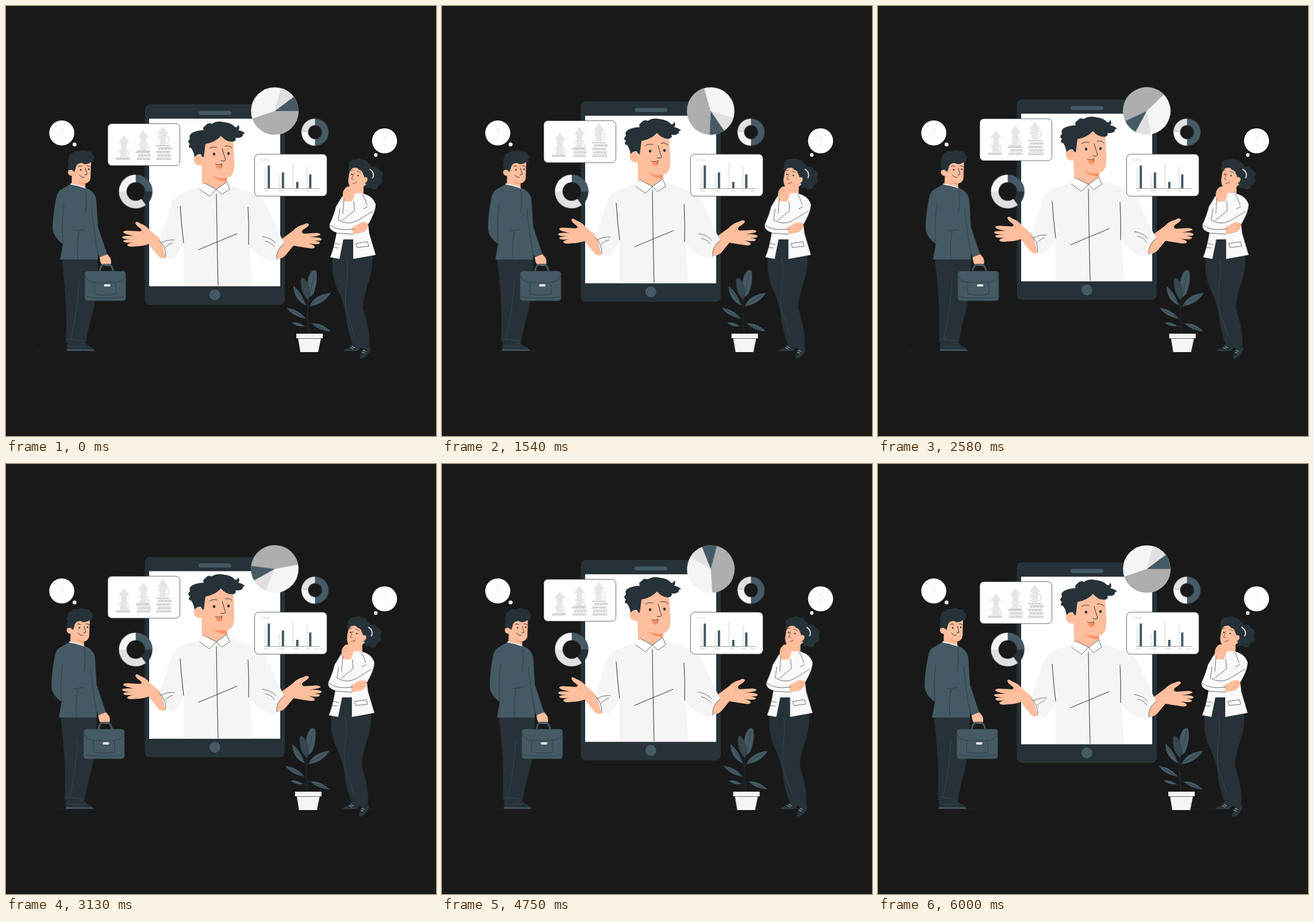
These frames come from a looping animation (748 px wide and 748 px high, 6.04 s). An HTML page:

```html
<!DOCTYPE html>
<html lang="en">
<head>
<meta charset="utf-8">
<title>Online presentation</title>
<style>
  html, body { margin: 0; width: 100%; height: 100%; overflow: hidden; background: #191919; }
  svg { display: block; width: 100vw; height: 100vh; }
  .float, .shake, .spin { animation: 6.04s linear infinite; }
  .float { animation-name: float; }
  .shake { animation-name: shake; }
  .spin { animation-name: spin; transform-origin: 467.5px 182.7px; }

  /* Six seconds of motion, then a 40 ms hold */
  @keyframes float {
    0%, 99.34%, 100% { transform: translateY(0); }
    49.67% { transform: translateY(-10px); }
  }
  @keyframes shake {
    0%, 99.34%, 100% { transform: translateX(0); }
    9.93%, 89.4% { transform: translateX(-1px); }
    19.87%, 79.47% { transform: translateX(2px); }
    29.8%, 49.67%, 69.54% { transform: translateX(-4px); }
    39.74%, 59.6% { transform: translateX(4px); }
  }
  @keyframes spin {
    from { transform: rotate(0); }
    99.34%, to { transform: rotate(360deg); }
  }

  .ink { fill: #263238; }
  .slate { fill: #455a64; }
  .skin { fill: #ffbe9d; }
  .warm { fill: #ff8f66; }
  .pale { fill: #f5f5f5; }
  .white { fill: #fff; }
  .soft { fill: #e6e6e6; }
  .line { fill: none; stroke: #263238; stroke-width: 1; stroke-linecap: round; stroke-linejoin: round; }
  .thin { stroke-width: .7; }
  .seam { fill: none; stroke: #455a64; stroke-width: .6; }
  .fold { fill: none; stroke: #eb996e; stroke-width: .8; stroke-linecap: round; }
  .ring circle { fill: none; }
  .coins { fill: none; stroke: #777; stroke-width: 2.4; stroke-dasharray: .8 1.6; }
  .rims { fill: none; stroke: #999; stroke-width: .6; }
  text { font-family: "Open Sans", "Noto Sans", sans-serif; text-anchor: middle; }
  .sum { font-size: 19px; font-weight: 700; fill: #e9e9e9; }
  .ask { font-size: 22px; fill: #efefef; }
</style>
</head>
<body>
<svg viewBox="0 0 748 748">
  <path d="M50 600H697" stroke="#242a2d" stroke-width=".8"/>

  <!-- Thought bubbles -->
  <g class="white">
    <circle cx="97" cy="220.8" r="21.8"/><circle cx="119.3" cy="240.8" r="3.4"/>
    <circle cx="658.5" cy="234.5" r="21.8"/><circle cx="643.2" cy="259.2" r="3.1"/>
  </g>
  <text class="ask" x="97" y="228.5">?</text>
  <text class="ask" x="658.5" y="242.5">?</text>

  <g class="float">
    <!-- Tablet -->
    <rect class="ink" x="241.5" y="171" width="243.5" height="349" rx="9"/>
    <rect class="white" x="249" y="196" width="228" height="291.5"/>
    <rect class="slate" x="335" y="182.5" width="57" height="7" rx="3.5"/>
    <circle class="slate" cx="363.3" cy="502.4" r="9.5"/>

    <!-- Presenter: hands -->
    <path class="skin" d="M278 438Q271 441 265 435L248 414Q238 418 226 418Q213 420 211 416Q211 413 222 411Q206 413 204 409Q204 406 221 406Q202 406 202 402Q203 399 222 400Q203 396 204 393Q206 390 215 391L233 392Q238 391 234 387Q226 382 225 377Q227 373 233 378Q243 381 250 390L269 406Z"/>
    <path class="fold" d="M236 388Q241 393 239 397"/>
    <path class="skin" d="M471 440Q480 440 486 434L500 417Q512 419 525 421Q537 423 537 419Q537 416 526 413Q545 416 546 412Q546 409 528 407Q549 410 549 406Q549 402 528 402Q548 400 547 397Q544 394 536 395L518 396Q512 394 517 389Q526 384 527 380Q524 376 518 380Q506 383 499 391L472 411Z"/>
    <path class="fold" d="M515 390Q509 394 511 399"/>

    <!-- Presenter: shirt -->
    <path class="pale" d="M341 314Q316 321 302 328Q291 334 286 350L267 408Q278 419 278 438Q291 444 298 431L309 414V487H428L424 418Q438 436 454 441Q464 446 471 442Q469 425 484 413Q470 385 454 349Q445 330 425 325L388 311Z"/>
    <path class="line" d="M366 327Q367 410 369 486M335 424L402 396M303 348Q305 380 309 412M421 350Q423 382 422 415"/>
    <path class="line thin" d="M267 408Q279 420 278 436M270 412Q281 406 293 407M277 420Q284 413 290 412M484 413Q469 424 471 441M446 401Q463 404 469 413M451 409Q463 412 467 419"/>

    <!-- Presenter: head -->
    <path class="skin" d="M340 262L341 310Q354 318 366 319Q378 315 385 305L384 280Z"/>
    <path class="warm" d="M357 294Q368 300 384 299V305Q368 305 357 294Z"/>
    <path class="skin" d="M341 239L341 260Q337 257 331 259Q325 263 327 270Q330 279 341 277Q344 291 366 298Q390 303 395 290Q398 283 397 267L395 229Q370 213 341 239Z"/>
    <path class="fold" d="M331 265Q336 264 338 271"/>
    <path class="ink" d="M328 263Q327 254 322 247Q315 246 320 240Q314 236 320 231Q317 224 325 220Q334 216 344 216Q341 211 347 208Q351 202 358 205Q367 199 379 202Q392 203 399 211Q404 211 403 206Q408 211 404 216Q411 217 416 222Q411 222 412 226Q407 231 399 229Q402 234 395 236Q383 237 374 226Q364 237 347 240L344 263Q341 263 339 258Q332 257 328 263Z"/>
    <path class="line" stroke-width="1.4" d="M354 248Q359 244 367 246M381 244Q388 242 393 247"/>
    <ellipse class="ink" cx="362" cy="257.5" rx="2.2" ry="2.6"/>
    <ellipse class="ink" cx="387" cy="256.5" rx="2.2" ry="2.6"/>
    <path class="line" d="M376 248Q380 262 382 268Q379 271 374 269"/>
    <path class="warm" d="M365 275Q371 277 376 274Q377 283 371 284Q366 283 365 275Z"/>
    <path class="line thin" d="M364 275Q371 277 376 274Q376 278 374 280"/>
    <path class="white" d="M345 308L366 319L354 331L337 319ZM366 319L384 306L389 319L375 328Z"/>
    <path class="line thin" d="M345 308L366 319L354 331L337 319M366 319L384 306L389 319L375 328L366 319"/>

    <!-- Savings card -->
    <rect x="177" y="204.7" width="125.5" height="73" rx="7" fill="#fff" stroke="#263238" stroke-width=".7"/>
    <path class="soft" d="M205 225.5L215 238H210V263H200V238H195ZM239 216L249 229H244V252H234V229H229ZM273 209.5L283 223H278V241H268V223H263Z"/>
    <text class="sum" x="204" y="264">10</text>
    <text class="sum" x="239.5" y="253">25</text>
    <text class="sum" x="274.5" y="239">50</text>
    <path class="coins" d="M192 266.5H216M228 266.5H251M230 260.5H252M227 254.5H250M262 266.5H287M264 260.5H288M262 254.5H286M265 248.5H288M262 243H286"/>
    <path class="rims" d="M192 264.5H216M228 264H251M230 258H252M227 252.5H250M262 264H287M264 258H288M262 252.5H286M265 246.5H288"/>
  </g>

  <!-- Bar chart card -->
  <rect x="432.5" y="257.8" width="125.8" height="73" rx="7" fill="#fff" stroke="#263238" stroke-width=".7"/>
  <g fill="#dedede">
    <circle cx="445" cy="267.7" r="1.7"/><circle cx="450.3" cy="267.7" r="1.7"/><circle cx="455.6" cy="267.7" r="1.7"/>
  </g>
  <path d="M451 283V317M475.5 294V317M499.5 273V317M523.5 280V317" stroke="#f0f0f0" stroke-width="4"/>
  <path d="M457.2 277.5V317M481.8 289.5V317M506.7 306V317M529.3 293V317" stroke="#455a64" stroke-width="4"/>
  <path d="M449 317.6H546" stroke="#999" stroke-width="1"/>
  <path d="M449 321.5H458M474 321.5H483M501 321.5H510M521 321.5H529M537 321.5H545" stroke="#ccc"/>

  <!-- Pie and ring charts -->
  <g class="spin">
    <g class="ring" stroke-width="41.3">
      <circle cx="467.5" cy="182.7" r="20.65" stroke="#f5f5f5"/>
      <circle cx="467.5" cy="182.7" r="20.65" stroke="#aeaeae" pathLength="360" stroke-dasharray="161 360"/>
      <circle cx="467.5" cy="182.7" r="20.65" stroke="#e0e0e0" pathLength="360" stroke-dasharray="38 360" stroke-dashoffset="-285"/>
      <circle cx="467.5" cy="182.7" r="20.65" stroke="#455a64" pathLength="360" stroke-dasharray="37 360" stroke-dashoffset="-323"/>
    </g>
  </g>
  <g class="ring" stroke-width="13.2" transform="translate(225.7 322.7) rotate(-90)">
    <circle r="22.7" stroke="#455a64" pathLength="360" stroke-dasharray="90 360"/>
    <circle r="22.7" stroke="#263238" pathLength="360" stroke-dasharray="53 360" stroke-dashoffset="-90"/>
    <circle r="22.7" stroke="#e0e0e0" pathLength="360" stroke-dasharray="127 360" stroke-dashoffset="-143"/>
    <circle r="22.7" stroke="#f5f5f5" pathLength="360" stroke-dasharray="90 360" stroke-dashoffset="-270"/>
  </g>
  <g class="ring" stroke-width="11.5" transform="translate(537.5 219.5) rotate(-90)">
    <circle r="17.8" stroke="#455a64" pathLength="360" stroke-dasharray="180 360"/>
    <circle r="17.8" stroke="#f5f5f5" pathLength="360" stroke-dasharray="95 360" stroke-dashoffset="-180"/>
    <circle r="17.8" stroke="#e0e0e0" pathLength="360" stroke-dasharray="85 360" stroke-dashoffset="-275"/>
  </g>

  <g class="shake">
    <!-- Man with briefcase -->
    <path class="ink" d="M97 438Q101 470 103 500Q106 535 104 584L139 585Q143 560 152 528Q160 486 160 438Z"/>
    <path class="seam" d="M127 480Q124 530 113 580M106 579L137 583"/>
    <path class="ink" d="M107 583H136Q142 591 151 595Q154 597 154 600H106Z"/>
    <path class="slate" d="M106 597L151 597.5Q154 598 154 599.5H106Z"/>
    <path class="seam" d="M106 590Q122 594 140 591M130 588L137 586"/>
    <path class="skin" d="M163 432L174 429L182 439Q185 450 179 452L168 451Q162 446 163 432Z"/>
    <path class="skin" d="M115 285L114 311Q126 318 138 315V298Z"/>
    <path class="slate" d="M112 310Q127 312 140 317Q154 322 157 336L160 384Q168 408 176 432L163 437L160 431V441H94L99 414Q82 402 81 386Q82 360 87 335Q89 322 98 318Z"/>
    <path class="pale" d="M112 308.5Q126 311 138 315.5L139 317.5Q126 312.5 112 310.5Z"/>
    <path class="line thin" d="M101 347Q96 375 99 414M138 320Q142 336 138 360M127 392Q123 415 125 440M120 391L138 389M149 352Q154 400 160 431"/>
    <path class="skin" d="M119 267L118 285Q113 282 109 285Q106 290 110 294Q114 297 119 295Q122 306 134 309Q145 309 147 300L148 269Q132 258 119 267Z"/>
    <path class="ink" d="M110 286Q106 279 109 273Q105 268 110 264Q109 257 116 256Q120 250 127 253Q135 248 141 253Q149 252 150 258Q156 262 152 267Q153 273 147 272Q139 278 132 273Q124 273 122 279L119 289Q114 283 110 286Z"/>
    <path class="line" d="M126 279Q129 277 132 279M141 278Q144 277 147 280M138 282Q140 289 141 293L137 294M128 294Q131 299 136 298"/>
    <circle class="ink" cx="130" cy="285" r="1.4"/>
    <circle class="ink" cx="144" cy="284" r="1.4"/>
    <path class="warm" d="M124 303Q130 308 138 309V310.5Q128 309 124 303Z"/>
    <path fill="none" stroke="#455a64" stroke-width="3" d="M163 463Q164 452 169 450H180Q185 452 187 463"/>
    <rect class="slate" x="137" y="461" width="71.5" height="52" rx="5" stroke="#263238" stroke-width=".6"/>
    <path class="line thin" d="M138 468Q139 480 156 481H190Q206 480 208 468M155 481Q153 493 155 501Q171 505 191 501Q193 491 190 481M140 506Q173 511 206 506"/>
    <rect x="170" y="483.5" width="12" height="5" rx="2" fill="#e6e6e6" stroke="#263238" stroke-width=".6"/>

    <!-- Woman thinking -->
    <path class="ink" d="M569 432Q564 461 575 489Q591 523 592 548Q597 575 604 590L614 594L631 597Q636 571 621 526Q621 510 629 485Q639 460 637 432Z"/>
    <path class="seam" d="M592 440Q597 460 592 483Q588 514 593 533Q600 553 607 574"/>
    <path class="ink" d="M603 588L617 594Q615 598 611 600H588Q588 597 595 595ZM622 592L633 594Q635 600 628 608Q623 615 616 613Q615 610 618 603Z"/>
    <path d="M599 594L604 597M602 592L607 595M619 602L624 604M621 599L626 601" stroke="#e6e6e6" stroke-width=".8"/>
    <path class="seam" d="M588 599H611M617 612Q626 607 633 595"/>
    <path class="skin" d="M601 302V327Q612 334 622 328V302Z"/>
    <path fill="#fafafa" d="M585 331Q603 324 620 326Q638 330 643 345Q643 358 630 380L632 396L643 433L604 440L603 406H587L580 440L564 437Q571 420 575 394Q561 390 563 380Q571 362 574 349Z"/>
    <path class="ink" d="M587 406H604V438H581Z"/>
    <path fill="#fafafa" d="M588 334L605 339L605 361L628 349Q640 353 630 366L604 385Q584 389 585 370Z"/>
    <path class="skin" d="M602 385L617 377Q625 374 630 379Q630 389 621 394L604 397Z"/>
    <path class="skin" d="M589 340Q584 330 587 322Q591 313 597 314L602 309Q606 310 602 317L608 320Q606 331 602 340Z"/>
    <path class="fold" d="M590 320L597 322M588 325L596 327M620 382L630 380M617 388L628 386"/>
    <path class="line thin" d="M588 334L586 361M605 340L606 356L585 373M581 353L578 372Q594 382 610 374L638 357M564 381Q575 392 605 388M575 395L604 397M620 327Q625 335 628 346M629 349L622 353M609 413L629 410L631 418L611 420ZM572 413L581 415M569 420L578 421"/>
    <g class="ink">
      <circle cx="640" cy="288" r="9"/><circle cx="648" cy="293" r="7.5"/><circle cx="648" cy="304" r="7"/>
      <circle cx="640" cy="311" r="8"/><circle cx="630" cy="311" r="6"/><circle cx="638" cy="300" r="11"/>
    </g>
    <path class="skin" d="M599 282L596 298Q594 306 598 314Q605 323 617 319L628 309L625 280Z"/>
    <path class="ink" d="M598 288Q593 285 597 279Q594 272 600 270Q602 265 609 267Q615 263 620 267Q628 267 630 273Q637 276 636 283Q640 291 634 297L632 314L624 308Q625 299 621 292Q620 286 614 285Q610 279 604 281Q601 283 598 288Z"/>
    <path class="skin" d="M620 300Q626 295 629 300Q629 308 621 309Z"/>
    <path fill="none" stroke="#f5f5f5" stroke-width="1.8" stroke-linecap="round" d="M633 284Q642 290 638 299"/>
    <path class="line thin" d="M599 287L604 285M610 288Q614 287 617 290M605 291Q603 298 601 301L605 302M603 309Q607 308 610 306"/>
    <circle class="ink" cx="601.5" cy="293" r="1.3"/>
    <circle class="ink" cx="612.5" cy="295" r="1.3"/>
    <path class="warm" d="M603 309Q608 309 610 306Q610 311 603 309Z"/>

    <!-- Plant -->
    <path class="line" stroke-width="1.5" d="M527 570Q522 530 527 500M526 548Q520 540 514 537M526 552Q538 551 548 557M526 525Q538 513 550 506M525 558L508 553M525 522Q516 512 507 502"/>
    <path class="slate" d="M525 507Q531 506 535 500Q543 479 540 462Q538 457 532 461Q523 471 524 490ZM522 521Q501 512 500 487Q515 499 522 521ZM528 522Q536 502 565 499Q553 519 528 522ZM521 544Q510 528 488 525Q499 540 521 544ZM532 553Q546 549 565 566Q545 565 532 553ZM519 557Q508 548 497 551Q507 559 519 557Z"/>
    <path class="line thin" d="M536 465Q531 490 526 512M502 491L520 516M530 520L559 502M493 527L518 542M536 555L558 563"/>
    <path fill="#37474f" stroke="#263238" stroke-width=".6" d="M526 512Q512 500 513 477Q514 471 519 474Q531 486 526 512Z"/>
    <path class="pale" d="M505 570H551V578H548L543 602H512L508 578H505Z"/>
    <path d="M508 578.4H548" stroke="#263238" stroke-width=".7"/>
  </g>
</svg>
</body>
</html>
```
